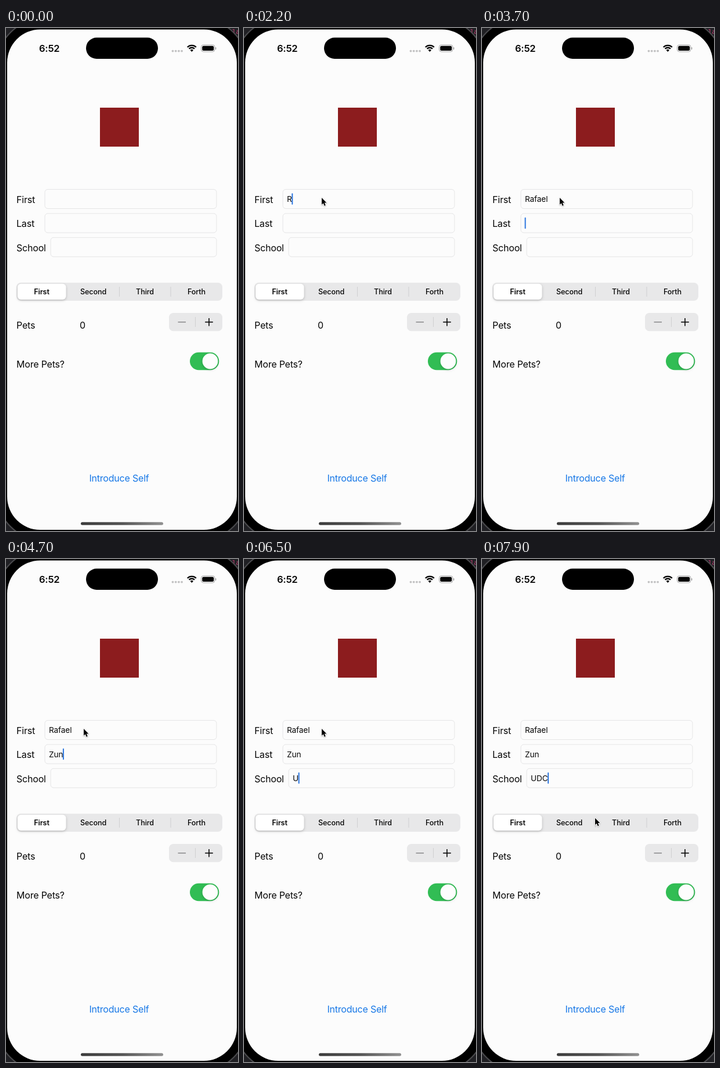
An HTML page with a canvas for the animation above (8 s loop, 400 by 865 pixels).

```html
<!DOCTYPE html>
<html lang="en">
<head>
<meta charset="utf-8">
<title>Introduction form</title>
<style>
html, body { margin: 0; width: 100%; height: 100%; overflow: hidden; background: #202024; }
canvas { display: block; width: 400px; height: 865px; }
</style>
</head>
<body>
<canvas id="stage"></canvas>
<script>
const W = 400, H = 865, LOOP = 8000;
const canvas = document.getElementById('stage');
const ctx = canvas.getContext('2d');
const dpr = window.devicePixelRatio || 1;
canvas.width = W * dpr;
canvas.height = H * dpr;

const SANS = 'Inter, "Liberation Sans", sans-serif';
const INK = '#050505', PAPER = '#fcfcfc', BLUE = '#1677e6', GREY = '#e8e8e9';

const fields = [
  { label: 'First', x: 67, y: 277.5, value: 'Rafael', focus: 800, keys: [2100, 2300, 2500, 2700, 2900, 3200] },
  { label: 'Last', x: 67, y: 319, value: 'Zun', focus: 3700, keys: [4200, 4500, 4700] },
  { label: 'School', x: 77, y: 360.3, value: 'UDC', focus: 5300, keys: [6400, 6700, 6900] }
];

function box(x, y, w, h, r, fill, stroke, width = 1) {
  ctx.beginPath();
  ctx.roundRect(x, y, w, h, r);
  if (fill) { ctx.fillStyle = fill; ctx.fill(); }
  if (stroke) { ctx.strokeStyle = stroke; ctx.lineWidth = width; ctx.stroke(); }
}

function dot(x, y, r, fill) {
  ctx.beginPath();
  ctx.arc(x, y, r, 0, 7);
  ctx.fillStyle = fill;
  ctx.fill();
}

function line(x1, y1, x2, y2, color, width) {
  ctx.beginPath();
  ctx.moveTo(x1, y1);
  ctx.lineTo(x2, y2);
  ctx.strokeStyle = color;
  ctx.lineWidth = width;
  ctx.stroke();
}

function setFont(size, weight = 400, family = SANS, spacing = -0.2) {
  ctx.font = `${weight} ${size}px ${family}`;
  ctx.letterSpacing = spacing + 'px';
}

function text(str, x, y, color = INK, align = 'left') {
  ctx.textAlign = align;
  ctx.fillStyle = color;
  ctx.fillText(str, x, y);
}

function shadow(color, blur, y) {
  ctx.shadowColor = color;
  ctx.shadowBlur = blur * dpr;
  ctx.shadowOffsetY = y * dpr;
}

function drawPhone() {
  ctx.fillStyle = '#202024';
  ctx.fillRect(0, 0, W, H);
  setFont(11, 400, '"Noto Sans Mono", monospace', 0);
  text('cla', 383, 10, '#c83f76');
  box(-14, -14, 428, 893, 74, '#000', '#4a4a4d', 2);
  box(2, 2.5, 396, 860.5, 57, PAPER);
}

function drawStatusBar() {
  setFont(16.5, 600);
  text('6:52', 57, 41);
  box(138, 16.5, 124, 36.5, 18.2, '#000');
  for (let i = 0; i < 4; i++) dot(287.5 + i * 5.2, 39.6, 1.9, '#c2c2c3');

  for (const r of [10.6, 6.7]) {
    ctx.beginPath();
    ctx.arc(320.3, 40.5, r, -Math.PI * 0.75, -Math.PI * 0.25);
    ctx.strokeStyle = INK;
    ctx.lineWidth = 2.4;
    ctx.stroke();
  }
  ctx.beginPath();
  ctx.moveTo(320.3, 41);
  ctx.arc(320.3, 40.7, 3.8, -Math.PI * 0.75, -Math.PI * 0.25);
  ctx.fillStyle = INK;
  ctx.fill();

  box(336.5, 29, 23.5, 11.8, 3.8, null, '#a5a5a6');
  box(338.2, 30.7, 20.1, 8.4, 2.5, INK);
  box(361, 33, 1.4, 4, 0.7, '#a5a5a6');
}

function drawSegments() {
  box(18, 438, 355, 31, 7.5, GREY);
  ctx.save();
  shadow('rgba(0,0,0,.22)', 4, 1.5);
  box(20, 439.8, 83.5, 27.2, 6, '#fff');
  ctx.restore();
  line(195.5, 445, 195.5, 462, '#cfcfd1', 1);
  line(284, 445, 284, 462, '#cfcfd1', 1);
  ['First', 'Second', 'Third', 'Forth'].forEach((name, i) => {
    setFont(12.6, i ? 500 : 600, SANS, -0.1);
    text(name, 61.5 + i * 89, 458.2, INK, 'center');
  });
}

function drawControls() {
  setFont(16);
  text('Pets', 18, 517);
  text('0', 127, 517);
  text('More Pets?', 18, 584);
  text('Introduce Self', 195, 779.6, BLUE, 'center');

  box(281, 490, 92, 31.3, 7.5, GREY);
  line(326.5, 497, 326.5, 514, '#cfcfd1', 1);
  line(296.5, 505.7, 310, 505.7, '#858587', 1.5);
  line(343.2, 505.7, 356.8, 505.7, INK, 1.6);
  line(350, 499, 350, 512.5, INK, 1.6);

  box(317, 557.7, 50.3, 30.6, 15.3, '#31bd54');
  ctx.save();
  shadow('rgba(0,0,0,.18)', 4, 1.5);
  dot(352, 573, 13.4, '#fdfdfd');
  ctx.restore();

  const bar = ctx.createLinearGradient(129, 0, 271, 0);
  bar.addColorStop(0, '#3c3c3c');
  bar.addColorStop(0.5, '#555');
  bar.addColorStop(1, '#929292');
  box(129, 849.8, 142, 5, 2.5, bar);
}

// The caret stays solid after each key, then fades out and back in.
function caretAlpha(age) {
  const p = age % 1000;
  if (p < 550) return 1;
  if (p < 700) return (700 - p) / 150;
  return p < 900 ? 0 : (p - 900) / 100;
}

function drawField(f, t, active) {
  setFont(16);
  text(f.label, 18, f.y + 23.2);
  box(f.x, f.y, 363 - f.x, 33, 5, PAPER, '#e5e5e6');

  const typed = f.keys.filter(k => k <= t);
  const value = f.value.slice(0, typed.length);
  const x = f.x + 7;
  setFont(13.6, 400, SANS, -0.1);
  text(value, x, f.y + 21.7);
  if (!active) return;

  const last = typed.length ? typed[typed.length - 1] : f.focus;
  ctx.globalAlpha = caretAlpha(t - last);
  box(x - 0.4 + ctx.measureText(value).width, f.y + 6.8, 2, 19.5, 1, '#2b75df');
  ctx.globalAlpha = 1;
}

function glide(from, to, p) {
  const k = Math.min(1, Math.max(0, p));
  const e = 1 - (1 - k) ** 3;
  return from.map((v, i) => v + (to[i] - v) * e);
}

function drawPointer(t) {
  if (t < 100) return;
  const rest = [133.3, 291];
  const [x, y] = t < 7300
    ? glide([330, 763], rest, (t - 100) / 500)
    : glide(rest, [194.3, 444.5], (t - 7300) / 500);
  ctx.save();
  ctx.translate(x, y);
  ctx.beginPath();
  ctx.moveTo(0.7, 1);
  ctx.lineTo(0.7, 12.8);
  ctx.lineTo(3.4, 10.3);
  ctx.lineTo(5.3, 14.8);
  ctx.lineTo(7.4, 13.9);
  ctx.lineTo(5.5, 9.5);
  ctx.lineTo(9.1, 9.4);
  ctx.closePath();
  ctx.lineJoin = 'round';
  ctx.lineWidth = 1.8;
  ctx.strokeStyle = '#fff';
  shadow('rgba(0,0,0,.3)', 2, 0.7);
  ctx.stroke();
  ctx.shadowColor = 'transparent';
  ctx.fillStyle = '#000';
  ctx.fill();
  ctx.restore();
}

function render(now) {
  const t = Math.floor((now % LOOP) / 100) * 100;
  ctx.setTransform(dpr, 0, 0, dpr, 0, 0);
  drawPhone();
  drawStatusBar();
  box(162, 137, 67, 67, 0, '#8c1c1e');
  const active = fields.filter(f => f.focus <= t).pop();
  fields.forEach(f => drawField(f, t, f === active));
  drawSegments();
  drawControls();
  drawPointer(t);
}

let start;
function tick(now) {
  start ??= now;
  render(now - start);
  requestAnimationFrame(tick);
}
requestAnimationFrame(tick);
</script>
</body>
</html>
```
